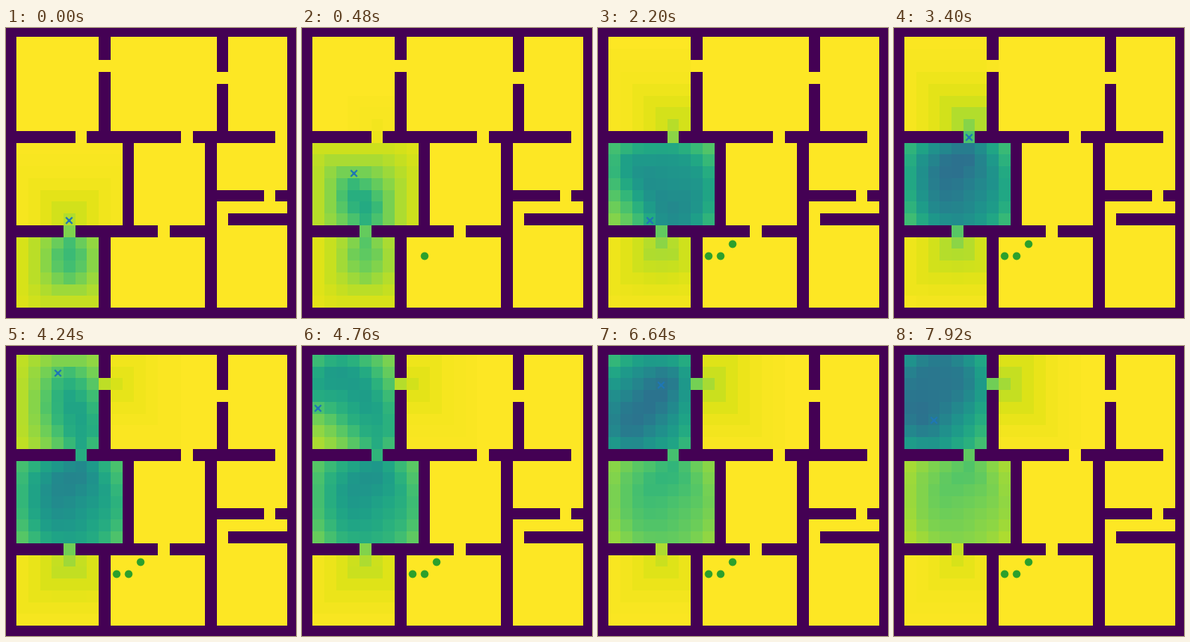
Recreate the animation shown at these times as a matplotlib script. Size 363 px wide and 363 px high, loop 8000 ms.

```python
import numpy as np
import matplotlib.pyplot as plt
from matplotlib.animation import FuncAnimation

SIZE, CELL, N = 363, 14.74, 25
LEFT, TOP, MARK_TOP = -1.7, -3.7, -2.6
TICK, LOOP = 40, 8000
STEPS_PER_MS = 0.011

# Strength, reach, ceiling and fading of the trail the walker leaves.
GAIN, REACH, CAP, FADE = 0.14, 1.9, 0.85, 0.02
OLD_GAIN, OLD_FADE = 0.11, 0.085

# Corners of the walk; a repeated corner is a pause of one step.
ROUTE = [(5, 16), (5, 14), (4, 14), (4, 12), (2, 12), (2, 11), (2, 11),
         (6, 11), (8, 11), (8, 16), (3, 16), (3, 15), (4, 15), (4, 11),
         (4, 11), (6, 11), (6, 11), (6, 5), (5, 5), (5, 2), (1, 2),
         (1, 5), (2, 5), (2, 5), (2, 6), (1, 6), (1, 7), (3, 7), (3, 8),
         (2, 8), (2, 6), (4, 6), (4, 4), (5, 4), (5, 2), (6, 2), (6, 3),
         (5, 3), (5, 1), (4, 1), (4, 1), (2, 1), (2, 2), (1, 2), (1, 6),
         (3, 6)]

# Green dots: (col, row, step at which it appears).
DOTS = [(10, 19, 5), (11, 18, 10), (9, 19, 21)]

free = np.zeros((N, N), bool)
free[1:-1, 1:-1] = True
cost = np.ones((N, N))


def wall(cells, toll, doors):
    """Close a row or column strip, leaving its doors open."""
    cells[:] = False
    for d in doors:
        cells[d] = True
        toll[d] = 2


def wall_row(r, c0, c1, *doors):
    wall(free[r, c0:c1 + 1], cost[r, c0:c1 + 1], [d - c0 for d in doors])


def wall_col(c, r0, r1, *doors):
    wall(free[r0:r1 + 1, c], cost[r0:r1 + 1, c], [d - r0 for d in doors])


wall_col(8, 1, 8, 3)
wall_col(18, 1, 8, 4)
wall_col(10, 10, 16)
wall_col(8, 18, 23)
wall_col(17, 10, 23)
wall_row(9, 1, 22, 6, 15)
wall_row(17, 1, 17, 5, 13)
wall_row(14, 18, 23, 22)
wall_row(16, 19, 23)


def walk(corners):
    spots = [corners[0]]
    for (c0, r0), (c1, r1) in zip(corners, corners[1:]):
        n = max(abs(c1 - c0), abs(r1 - r0), 1)
        spots += [(c0 + (c1 - c0) * i // n, r0 + (r1 - r0) * i // n)
                  for i in range(1, n + 1)]
    return spots


def shift(a, dx, dy):
    return np.roll(a, (dy, dx), (0, 1))


cache = {}


def kernel(spot):
    """Decay with the walking distance, without cutting corners."""
    if spot not in cache:
        dist = np.full((N, N), np.inf)
        dist[spot[1], spot[0]] = 0
        for _ in range(14):
            best = dist.copy()
            for dx in (-1, 0, 1):
                for dy in (-1, 0, 1):
                    ok = free & shift(free, dx, 0) & shift(free, 0, dy)
                    near = shift(dist, dx, dy) + cost
                    best = np.where(ok, np.minimum(best, near), best)
            dist = best
        cache[spot] = np.exp(-dist / REACH)
    return cache[spot]


def build_fields(spots):
    old = OLD_GAIN * sum(kernel((5, r)) for r in range(17, 22))
    trail = np.zeros((N, N))
    fields = []
    for n, spot in enumerate(spots):
        loss = trail + old * np.exp(-OLD_FADE * n)
        fields.append(np.where(free, 1 - loss, 0))
        trail = trail * (1 - FADE)
        trail = trail + GAIN * kernel(spot) * (1 - trail / CAP)
    return fields


def center(c, r):
    return LEFT + CELL * (c + 0.5), MARK_TOP + CELL * (r + 0.5)


spots = walk(ROUTE)
fields = build_fields(spots)

fig = plt.figure(figsize=(SIZE / 100, SIZE / 100), dpi=100)
ax = fig.add_axes([0, 0, 1, 1])
ax.axis("off")
image = ax.imshow(fields[0], cmap="viridis", vmin=0, vmax=1,
                  interpolation="nearest", aspect="auto",
                  extent=(LEFT, LEFT + N * CELL, TOP + N * CELL, TOP))
ax.set_xlim(0, SIZE)
ax.set_ylim(SIZE, 0)
cross, = ax.plot([], [], "x", color="tab:blue", ms=6, mew=1.5)
dots, = ax.plot([], [], "o", color="tab:green", ms=6, mew=1)


def draw(frame):
    step = min(int(frame * TICK * STEPS_PER_MS + 0.2), len(spots) - 1)
    image.set_data(fields[step])
    x, y = center(*spots[step])
    cross.set_data([x], [y])
    shown = [center(c, r) for c, r, first in DOTS if step >= first]
    dots.set_data([p[0] for p in shown], [p[1] for p in shown])
    return image, cross, dots


anim = FuncAnimation(fig, draw, frames=LOOP // TICK, interval=TICK,
                     repeat=True, repeat_delay=0)
plt.show()
```
